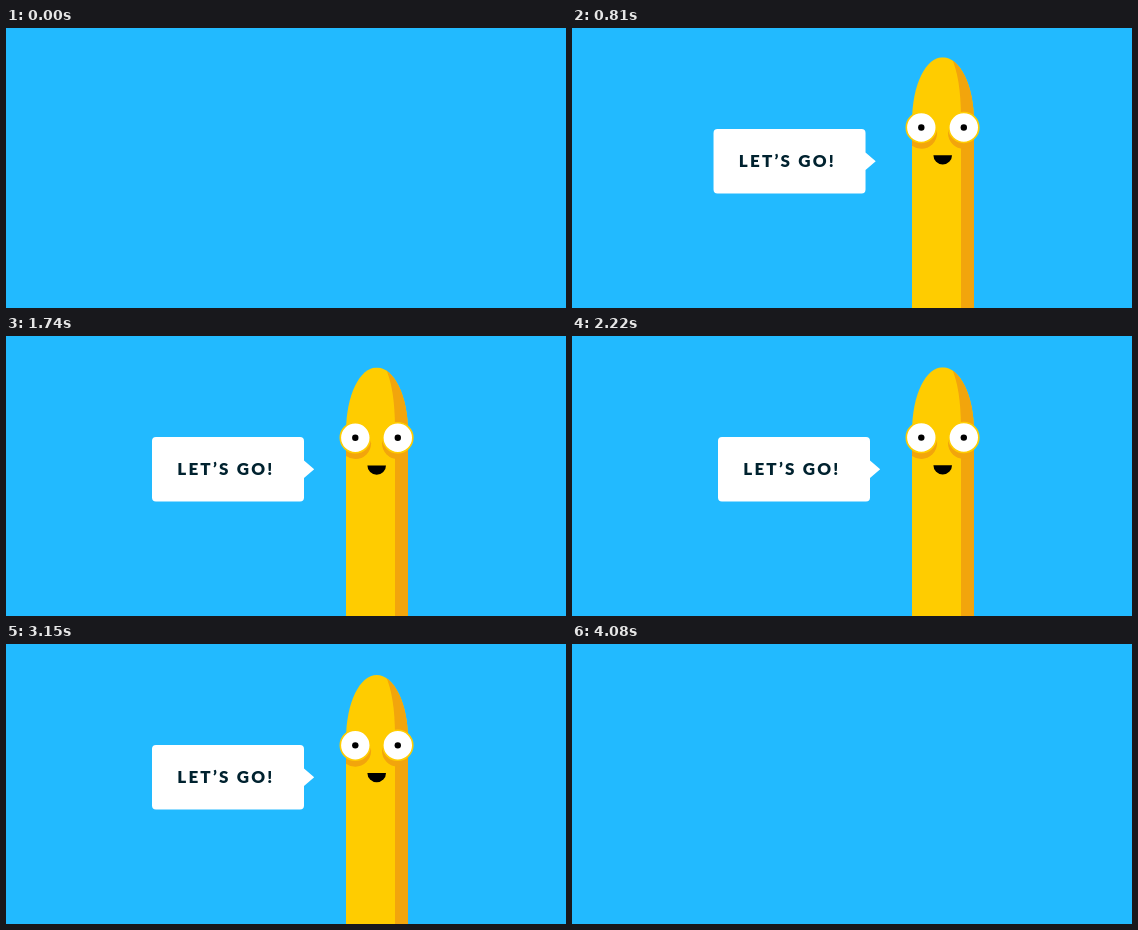
An HTML page for the animation above (4500 ms loop, 560x280 px).

```html
<!DOCTYPE html>
<html lang="en">
<head>
<meta charset="utf-8">
<title>Let’s go</title>
<style>
  html, body { margin: 0; width: 100%; height: 100%; overflow: hidden; background: #22baff; }
  svg { display: block; width: 100vw; height: 100vh; }
  text { font: 900 17px Lato, sans-serif; letter-spacing: 2.2px; fill: #00222f; }
</style>
</head>
<body>
<svg viewBox="0 0 560 280">
  <defs>
    <clipPath id="skin">
      <path d="M340 600V96C340 58 354 31 370.7 31S402 58 402 96V600Z"/>
    </clipPath>
  </defs>
  <rect width="560" height="280" fill="#22baff"/>

  <g id="bubble">
    <path fill="#fff" d="M150 101H294a4 4 0 0 1 4 4V124.5L308.2 133.3 298 142V161.5a4 4 0 0 1 -4 4H150a4 4 0 0 1 -4 -4V105a4 4 0 0 1 4 -4Z"/>
    <text x="171.3" y="139">LET’S GO!</text>
  </g>

  <g id="hero">
    <g clip-path="url(#skin)">
      <rect x="330" y="25" width="80" height="575" fill="#ffcc00"/>
      <path fill="#f2a50c" d="M378 28C385 42 389 62 389 92V600H410V28Z"/>
      <g fill="#f2a50c">
        <circle cx="349.3" cy="106.8" r="15.8"/>
        <circle cx="391.8" cy="106.8" r="15.8"/>
      </g>
    </g>
    <g fill="#fff" stroke="#ffcc00" stroke-width="1.6">
      <circle cx="349.3" cy="101.2" r="15"/>
      <circle cx="391.8" cy="101.2" r="15"/>
    </g>
    <circle cx="349.3" cy="101.3" r="3.2"/>
    <circle cx="391.8" cy="101.3" r="3.2"/>
    <path d="M361.4 128.9H380a9.3 9.3 0 0 1 -18.6 0Z"/>
  </g>
</svg>
<script>
  const LOOP = 4500, STEP = 30;
  const hero = document.getElementById('hero');
  const bubble = document.getElementById('bubble');

  const part = (t, from, to) => Math.min(1, Math.max(0, (t - from) / (to - from)));
  const easeOut = (u, n) => 1 - (1 - u) ** n;
  const easeInOut = u => (1 - Math.cos(Math.PI * u)) / 2;
  const leave = t => part(t, 3735, 4080) ** 2.5;

  // Quick rise, then a damped bounce around the resting height.
  function heroY(t) {
    const rise = 603;
    if (t < rise) return 252 * (1 - easeOut(part(t, 435, rise), 1.8));
    const s = (t - rise) / 1000;
    const bounce = -15.8 * Math.exp(-2.4 * s) * Math.sin(2 * Math.PI * s / 0.44);
    return bounce + 255 * leave(t);
  }

  // Slides in past its place, settles, later flies off to the left.
  function bubbleX(t) {
    const over = -4.8;
    if (t < 830) return over + 44 * (1 - easeOut(part(t, 600, 830), 2));
    return over * (1 - easeInOut(part(t, 830, 1190))) - 312 * leave(t);
  }

  function draw(t) {
    const on = t >= 450 && t < 4080;
    hero.style.display = bubble.style.display = on ? '' : 'none';
    hero.setAttribute('transform', `translate(0 ${heroY(t).toFixed(2)})`);
    bubble.setAttribute('transform', `translate(${bubbleX(t).toFixed(2)} 0)`);
    bubble.setAttribute('opacity', part(t, 600, 750));
  }

  let start;
  function tick(now) {
    start ??= now;
    draw(Math.floor((now - start) % LOOP / STEP) * STEP);
    requestAnimationFrame(tick);
  }
  draw(0);
  requestAnimationFrame(tick);
</script>
</body>
</html>
```
